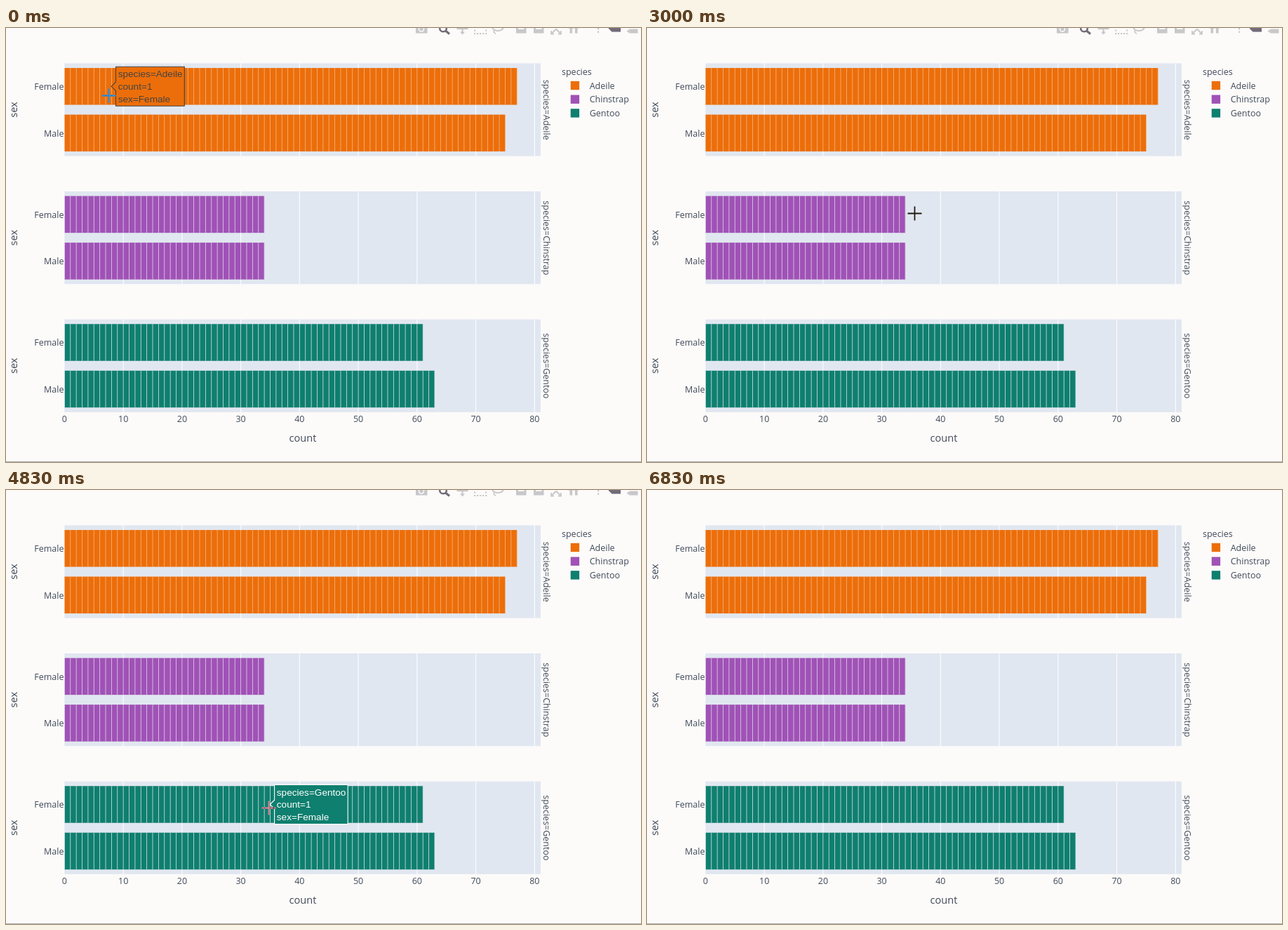
An HTML page with a canvas for the animation above (7670 ms loop, 905 by 619 pixels).

```html
<!DOCTYPE html>
<html lang="en">
<head>
<meta charset="utf-8">
<title>Penguin counts</title>
<style>
  html, body { margin: 0; width: 100%; height: 100%; overflow: hidden; background: #fcfbfa; }
  canvas { display: block; }
</style>
</head>
<body>
<canvas id="stage" width="905" height="619"></canvas>
<script>
const ctx = document.getElementById('stage').getContext('2d');
const LOOP = 7670, STEP = 1000 / 6, LAST_STEP = 41;
const LEFT = 83.4, RIGHT = 762, UNIT = 8.374, PANEL_H = 132.3, BAR_H = 52.5;
const PAGE = '#fcfbfa', PANEL = '#e1e7f0', TEXT = '#414a58', PALE = '#c8c7ca', DARK = '#736b78';
const SANS = '"Open Sans", sans-serif', ARIAL = '"Liberation Sans", Arial, sans-serif';

const sexes = ['Female', 'Male'];
const panels = [
  { name: 'Adeile', color: '#ec6e0a', seam: '#f3b683', ink: '#444444', counts: [77, 75] },
  { name: 'Chinstrap', color: '#a052b6', seam: '#e0d3ea', ink: '#ffffff', counts: [34, 34] },
  { name: 'Gentoo', color: '#0f7f6f', seam: '#d3e2e6', ink: '#ffffff', counts: [61, 63] }
].map((panel, i) => ({ ...panel, top: 50.4 + i * 182.6 }));
const barMid = (panel, row) => panel.top + 32.9 + row * 66.5;
const countX = n => LEFT + n * UNIT;

// Pointer stops
const stops = [
  { at: 0, x: 145.5, y: 96 },
  { at: 5, x: 550, y: 100 },
  { at: 11, x: 564, y: 148 },
  { at: 14, x: 604, y: 150 },
  { at: 18, x: 381, y: 264 },
  { at: 21, x: 346, y: 306 },
  { at: 25, x: 360, y: 380.5 },
  { at: 29, x: 374, y: 453 },
  { at: 35, x: 540.5, y: 533 },
  { at: 40, x: 560, y: 534 }
];

function pointerAt(step) {
  const s = Math.max(0, step);
  const i = Math.max(1, stops.findIndex(stop => stop.at >= s));
  const a = stops[i - 1], b = stops[i];
  const k = (s - a.at) / (b.at - a.at);
  return { x: a.x + (b.x - a.x) * k, y: a.y + (b.y - a.y) * k };
}

function label(text, x, y, { size = 12.5, align = 'left', angle = 0, font = SANS, color = TEXT } = {}) {
  ctx.save();
  ctx.translate(x, y);
  ctx.rotate(angle);
  ctx.font = `${size}px ${font}`;
  ctx.textAlign = align;
  ctx.fillStyle = color;
  ctx.fillText(text, 0, size * 0.36);
  ctx.restore();
}

function rect(color, x, y, w, h) {
  ctx.fillStyle = color;
  ctx.fillRect(x, y, w, h);
}

function stroke(color, width) {
  ctx.strokeStyle = color;
  ctx.lineWidth = width;
  ctx.stroke();
}

function trace(points) {
  ctx.beginPath();
  points.forEach(([x, y]) => ctx.lineTo(x, y));
}

function line(points, color, width) {
  trace(points);
  stroke(color, width);
}

function polygon(points, fill, edge) {
  trace(points);
  ctx.closePath();
  ctx.fillStyle = fill;
  ctx.fill();
  if (edge) stroke(edge, 1.1);
}

function ellipse(x, y, rx, ry, color, width) {
  ctx.beginPath();
  ctx.ellipse(x, y, rx, ry, 0, 0, 7);
  stroke(color, width);
}

function drawPanel(panel) {
  const { name, color, seam, top, counts } = panel, mid = top + PANEL_H / 2;
  rect(PANEL, LEFT, top, RIGHT - LEFT, PANEL_H);
  for (let n = 10; n <= 80; n += 10) rect('#fafbfd', countX(n) - 0.6, top, 1.2, PANEL_H);
  counts.forEach((count, row) => {
    const y = barMid(panel, row) - BAR_H / 2;
    rect(color, LEFT, y, count * UNIT, BAR_H);
    for (let n = 0; n <= count; n++) rect(seam, countX(n) - 0.4, y, 0.8, BAR_H);
    label(sexes[row], 82.5, barMid(panel, row) + 0.2, { align: 'right' });
  });
  label('sex', 11, mid, { size: 14.6, align: 'center', angle: -Math.PI / 2 });
  label('species=' + name, 770.5, mid + 0.2, { align: 'center', angle: Math.PI / 2 });
}

function drawChart() {
  rect(PAGE, 0, 0, 905, 619);
  panels.forEach(drawPanel);
  for (let n = 0; n <= 80; n += 10) label(n, countX(n), 557, { align: 'center' });
  label('count', 423, 585, { size: 14.6, align: 'center' });
  label('species', 792, 62.3);
  panels.forEach((panel, i) => {
    const y = 82 + i * 19.7;
    rect(panel.color, 804.7, y - 6.2, 12.4, 12.4);
    label(panel.name, 831.7, y);
  });
  rect('#acacac', 0, 618, 905, 1);
}

// Toolbar icons, cut off by the top edge
const icons = {
  camera(x) {
    rect(PALE, x - 8, 0, 16.5, 7.5);
    ellipse(x, 1.5, 3.5, 3.5, PAGE, 1.6);
  },
  magnifier(x) {
    ellipse(x - 2, 0.5, 4.8, 4.8, DARK, 2.6);
    line([[x + 1.5, 4], [x + 7, 8.5]], DARK, 3);
  },
  pan(x) {
    line([[x - 8, 1], [x + 8, 1]], PALE, 2.2);
    line([[x, 0], [x, 8]], PALE, 2.2);
    polygon([[x - 3.5, 5.5], [x + 3.5, 5.5], [x, 9.5]], PALE);
  },
  boxSelect(x) {
    for (let d = -8; d <= 8; d += 4) rect(PALE, x + d - 1, 7, 2.2, 2);
    for (const side of [-8, 8]) rect(PALE, x + side - 1, 2.5, 2.2, 2);
  },
  lasso(x) {
    ellipse(x, -0.5, 7.5, 4.5, PALE, 2);
    line([[x - 5, 3], [x - 6, 5.5], [x - 3, 8.5]], PALE, 1.6);
  },
  zoomBox(x) {
    rect(PALE, x - 7, 0, 14.5, 7.5);
    rect(PAGE, x - 4, 0, 8.5, 1.8);
  },
  autoscale(x) {
    for (const s of [-1, 1]) {
      line([[x, 1.5], [x + s * 6, 7.5]], PALE, 2);
      line([[x + s * 7, 4], [x + s * 7, 8.5], [x + s * 3, 8.5]], PALE, 1.8);
    }
  },
  home(x) {
    polygon([[x - 8, 0.5], [x, -7], [x + 8, 0.5]], PALE);
    for (const s of [-1, 1]) rect(PALE, x + s * 3.7 - 1.8, 0, 3.6, 7.5);
  },
  spike(x) {
    for (const y of [0, 4.5]) rect(PALE, x - 1, y, 2.2, 2.3);
  },
  tag(x, y, color) {
    polygon([[x - 9, y], [x - 4, y - 5], [x + 8.5, y - 5], [x + 8.5, y + 5], [x - 4, y + 5]], color);
  },
  tagPair(x) {
    rect(PALE, x - 4, 1.5, 12, 6);
    polygon([[x - 8, 4.5], [x - 4, 1.5], [x - 4, 7.5]], PALE);
  }
};

function drawToolbar(alpha) {
  ctx.save();
  ctx.globalAlpha = alpha;
  icons.camera(592);
  icons.magnifier(625);
  icons.pan(650.5);
  icons.boxSelect(676);
  icons.lasso(701);
  icons.zoomBox(734);
  icons.zoomBox(759);
  icons.autoscale(784);
  icons.home(809);
  icons.spike(844);
  icons.tag(867.5, 0.5, DARK);
  icons.tagPair(892.5);
  ctx.restore();
}

function hoveredBar({ x, y }) {
  const index = Math.floor((x - LEFT) / UNIT);
  for (const panel of panels) {
    const row = sexes.findIndex((_, r) => Math.abs(y - barMid(panel, r)) <= BAR_H / 2);
    if (row >= 0 && index < panel.counts[row]) return { panel, row, index };
  }
  return null;
}

function drawTooltip({ panel, row, index }) {
  const size = 13.6, half = 28, notch = 6.3;
  const lines = ['species=' + panel.name, 'count=1', 'sex=' + sexes[row]];
  ctx.font = `${size}px ${ARIAL}`;
  const width = Math.max(...lines.map(s => ctx.measureText(s).width)) + 6;
  const tip = countX(index + 1) - 0.2, y = barMid(panel, row);
  const x0 = tip + notch, x1 = x0 + width;
  polygon([[tip, y], [x0, y - notch], [x0, y - half], [x1, y - half],
    [x1, y + half], [x0, y + half], [x0, y + notch]], panel.color, panel.ink);
  lines.forEach((s, i) => label(s, x0 + 3.2, y + (i - 1) * 17.7, { size, font: ARIAL, color: panel.ink }));
}

function drawCrosshair(x, y) {
  ctx.save();
  ctx.globalCompositeOperation = 'difference';
  ctx.translate(Math.round(x) + 0.5, Math.round(y) + 0.5);
  trace([[-10, 0], [10, 0]]);
  ctx.moveTo(0, -10);
  ctx.lineTo(0, 10);
  stroke('#fff', 1.8);
  ctx.restore();
}

function drawResizeArrow(x, y) {
  const half = [[4.5, -1.6], [4.5, -5], [9.5, 0], [4.5, 5], [4.5, 1.6]];
  const points = [1, -1].flatMap(s => half.map(([dx, dy]) => [x + s * dx, y + s * dy]));
  polygon(points, '#ffffff', '#222222');
}

function drawPointer({ x, y }) {
  const overPanel = panels.some(p => y >= p.top && y <= p.top + PANEL_H);
  (overPanel ? drawCrosshair : drawResizeArrow)(x, y);
}

function render() {
  const time = performance.now() % LOOP;
  const step = Math.min(LAST_STEP, Math.floor((time + 4) / STEP));
  drawChart();
  if (step < LAST_STEP) drawToolbar(step === LAST_STEP - 1 ? 0.5 : 1);
  if (step < LAST_STEP - 1) {
    // the tooltip trails the pointer by half a step
    const bar = hoveredBar(pointerAt(step - 0.5));
    if (bar) drawTooltip(bar);
    drawPointer(pointerAt(step));
  }
  requestAnimationFrame(render);
}
render();
</script>
</body>
</html>
```
